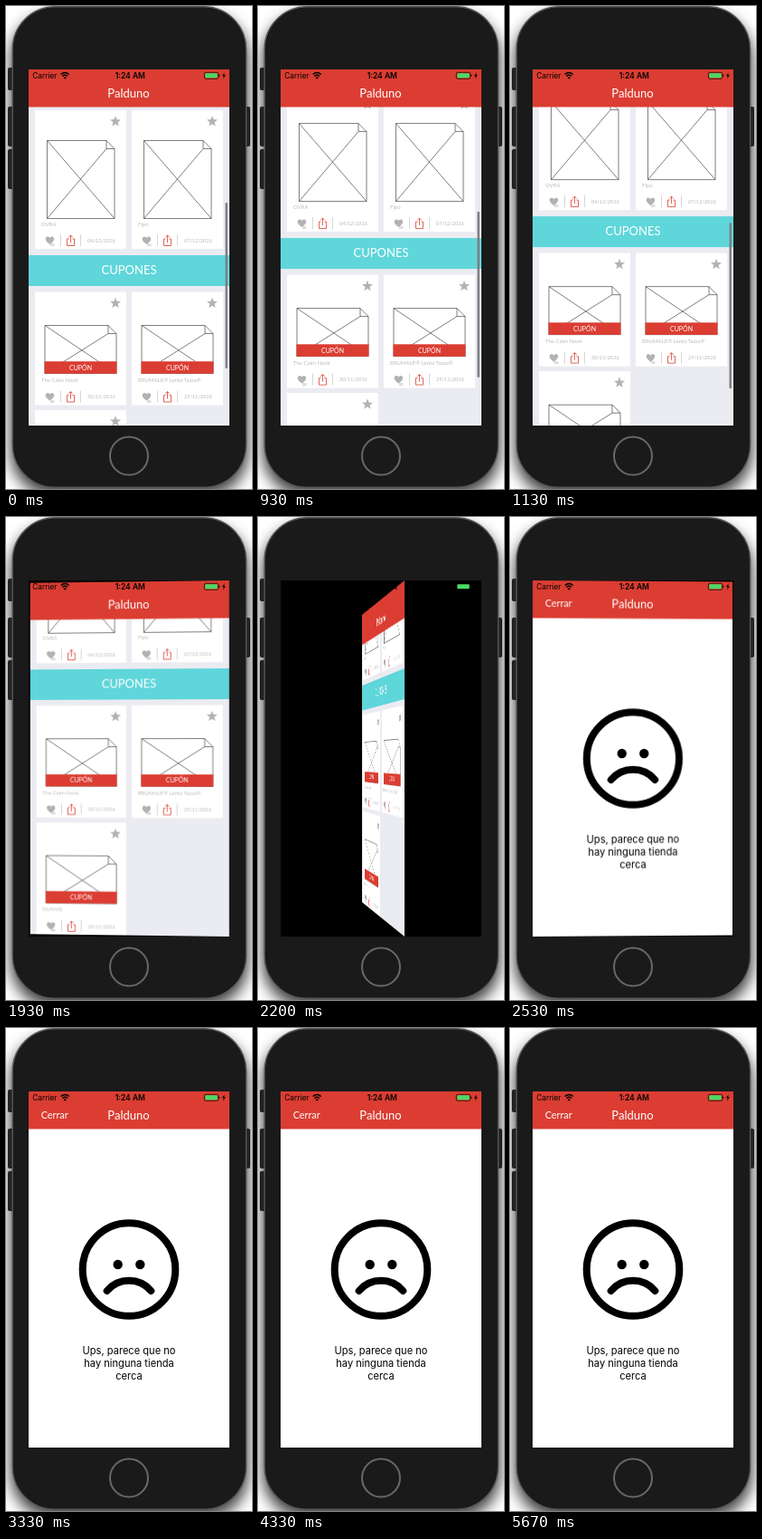
An HTML page for the animation above (5790 ms loop, 272 by 533 pixels).

```html
<!DOCTYPE html>
<html lang="es">
<head>
<meta charset="utf-8">
<style>
html, body { margin: 0; width: 100%; height: 100%; overflow: hidden; background: #fff; }
#stage { position: relative; width: 272px; height: 533px; overflow: hidden; }
#stage svg { position: absolute; left: 0; top: 0; display: block; }
#shadow { position: absolute; left: 8px; top: 4px; width: 257px; height: 526px; border-radius: 46px; box-shadow: 0 8px 16px 3px rgba(0,0,0,.75); }
#screen { position: absolute; left: 25px; top: 70px; width: 222px; height: 393px; overflow: hidden; background: #000; perspective: 903px; }
text { font-family: Lato, sans-serif; }
.mid { text-anchor: middle; }
.sys { font-family: Inter, sans-serif; }
</style>
</head>
<body>
<div id="stage">
  <div id="shadow"></div>
  <svg width="272" height="533">
    <g fill="#222223">
      <rect x="2" y="68" width="8" height="25" rx="2"/>
      <rect x="2" y="111" width="8" height="44" rx="2"/>
      <rect x="2" y="158" width="8" height="44" rx="2"/>
      <rect x="262" y="111" width="8" height="44" rx="2"/>
    </g>
    <rect x="7.2" y=".7" width="258.4" height="530.6" rx="47" fill="#1a1a1b" stroke="#58585a" stroke-width="1.4"/>
    <circle cx="136" cy="496.5" r="21" fill="none" stroke="#68686a" stroke-width="2"/>
  </svg>
  <div id="screen"></div>
</div>
<script>
const RED = '#db3d32', GREY = '#b2b2b4';
const LOOP = 5790, HALF = 111;
const svg = (id, body) =>
  `<svg id="${id}" width="222" height="393" viewBox="25 70 222 393">${body}</svg>`;
const text = (x, y, size, fill, str, cls = '', extra = '') =>
  `<text x="${x}" y="${y}" font-size="${size}" fill="${fill}" class="${cls}" ${extra}>${str}</text>`;
const rect = (x, y, w, h, fill) =>
  `<rect x="${x}" y="${y}" width="${w}" height="${h}" fill="${fill}"/>`;

function star(x, y) {
  const pts = Array.from({ length: 10 }, (_, i) => {
    const a = i * Math.PI / 5, r = i % 2 ? 2.7 : 6.3;
    return [x + r * Math.sin(a), y - r * Math.cos(a)].map(v => v.toFixed(2));
  });
  return `<polygon points="${pts.join(' ')}" fill="${GREY}"/>`;
}

// Empty picture: crossed sheet with a folded corner
function sheet(x0, y0, x1, y1) {
  const fx = x1 - 9, fy = y0 + 9;
  return `<path d="M${x0} ${y0}H${fx}L${x1} ${fy}V${y1}H${x0}ZM${fx} ${y0}V${fy}H${x1}
    M${x0} ${y0}L${x1} ${y1}M${fx} ${fy}L${x0} ${y1}" fill="none" stroke="#222" stroke-width=".58"/>`;
}

function card(x, y, name, date, coupon) {
  const h = coupon ? 125 : 153;
  const picture = coupon
    ? sheet(11, 37, 90, 90) + rect(10.5, 76.7, 80, 13.5, RED) + text(50.5, 86, 7, '#fff', 'CUPÓN', 'mid')
    : sheet(13.5, 33.5, 88, 119.5);
  return `<g transform="translate(${x} ${y})">
    ${rect(0, 0, 101, h, '#fff')}${star(89, 12.5)}${picture}
    ${text(7, h - 25.5, 6, '#bcbcbe', name)}
    <g transform="translate(0 ${h - 9})">
      <path d="M16.5 4C9 -1 12 -5 14.5 -4.5Q16 -4.2 16.5 -3Q17 -4.2 18.5 -4.5C21 -5 24 -1 16.5 4Z" fill="${GREY}"/>
      ${text(16.5, 6, 4.5, '#a4a4a6', '28')}
      <path d="M28.5 -7V6M50.5 -7V6" stroke="#ccc" stroke-width=".8"/>
      <path d="M37.5 -2H35.5V5.5H43.5V-2H41.5M39.5 2V-6M37.3 -3.8L39.5 -6L41.7 -3.8" fill="none" stroke="${RED}" stroke-width=".8"/>
      ${text(58, 1.8, 5.6, '#b4b4b6', date, '', 'font-style="italic"')}
    </g></g>`;
}

const header = rect(25, 70, 222, 41.5, RED) + text(135.5, 100.5, 13, '#fff', 'Palduno', 'mid');

const list = rect(25, 70, 222, 393, '#ebebf2') +
  `<g id="cards">
    ${card(32, 115, 'OVRA', '04/12/2016')}
    ${card(139, 115, 'Fipo', '07/12/2016')}
    ${rect(25, 275, 222, 34, '#5fd6da')}
    ${text(136, 295.7, 13, '#fff', 'CUPONES', 'mid')}
    ${card(32, 315.5, 'The Calm Nook', '30/11/2016', true)}
    ${card(139, 315.5, 'BRUMALÉ® Lenta Tazza®', '29/11/2016', true)}
    ${card(32, 446, 'DUNVO', '30/11/2016', true)}
  </g>
  <rect id="bar" x="242.5" y="217" width="2.4" height="183" rx="1.2" fill="#7c7c82"/>` + header;

const empty = rect(25, 70, 222, 393, '#fff') + header +
  text(38.7, 99.5, 10.8, '#fff', 'Cerrar') +
  `<g fill="none" stroke="#000" stroke-width="8" stroke-linecap="round">
    <circle cx="136" cy="266.5" r="51.3"/>
    <path d="M111.7 290A32 32 0 0 1 160.3 290"/>
  </g>
  <circle cx="123.7" cy="261" r="5.2"/><circle cx="148.3" cy="261" r="5.2"/>` +
  ['Ups, parece que no', 'hay ninguna tienda', 'cerca']
    .map((line, i) => text(136, 360 + 14 * i, 11.1, '#000', line, 'mid sys')).join('');

const status = text(29.3, 80.2, 8.3, '#000', 'Carrier', 'sys') +
  text(137.3, 80.2, 8.5, '#000', '1:24 AM', 'sys mid', 'font-weight="600"') +
  `<g fill="none" stroke="#000" stroke-width="1.4">
    <path d="M60.6 75.6Q65.2 71.4 69.8 75.6M62.4 77.6Q65.2 75.1 68 77.6"/>
  </g>
  <path d="M63.6 79L65.2 80.7L66.8 79Q65.2 77.7 63.6 79Z"/>
  <rect x="219.3" y="73.3" width="15.4" height="7" rx="1.6" fill="none" stroke="#000" stroke-width=".7"/>
  <rect x="220.3" y="74.3" width="13.4" height="5" rx=".8" fill="#4cd964"/>
  <path d="M235.4 75.5V78.1Q236.5 77.8 236.5 76.8T235.4 75.5Z"/>
  <path d="M241.8 73L239 77.3H240.8L240 80.6L242.8 76.2H241Z"/>`;

const $ = id => document.getElementById(id);
$('screen').innerHTML = svg('list', list) + svg('empty', empty) + svg('status', status);

const progress = (t, from, to) => Math.min(1, Math.max(0, (t - from) / (to - from)));
const smooth = x => x * x * (3 - 2 * x);

// The nearer vertical edge always stays in the plane of the screen
function turn(page, angle, depth, shown) {
  page.style.visibility = shown ? 'visible' : 'hidden';
  page.style.transform = depth > 0.01 ? `translateZ(${-depth}px) rotateY(${angle}deg)` : 'none';
}

function draw(t) {
  const scroll = 108 * smooth(progress(t, 70, 1600) ** 2.3);
  $('cards').setAttribute('transform', `translate(0 ${-scroll})`);
  $('bar').setAttribute('y', 217 + scroll * 0.52);
  $('bar').setAttribute('opacity', 1 - progress(t, 1600, 1850));

  const angle = 180 * smooth(progress(t, 1860, 2570) ** 1.09);
  const depth = HALF * Math.sin(angle * Math.PI / 180);
  turn($('list'), -angle, depth, angle < 90);
  turn($('empty'), 180 - angle, depth, angle >= 90);
}

const start = performance.now();
function frame() {
  draw((performance.now() - start) % LOOP);
  requestAnimationFrame(frame);
}
frame();
</script>
</body>
</html>
```
